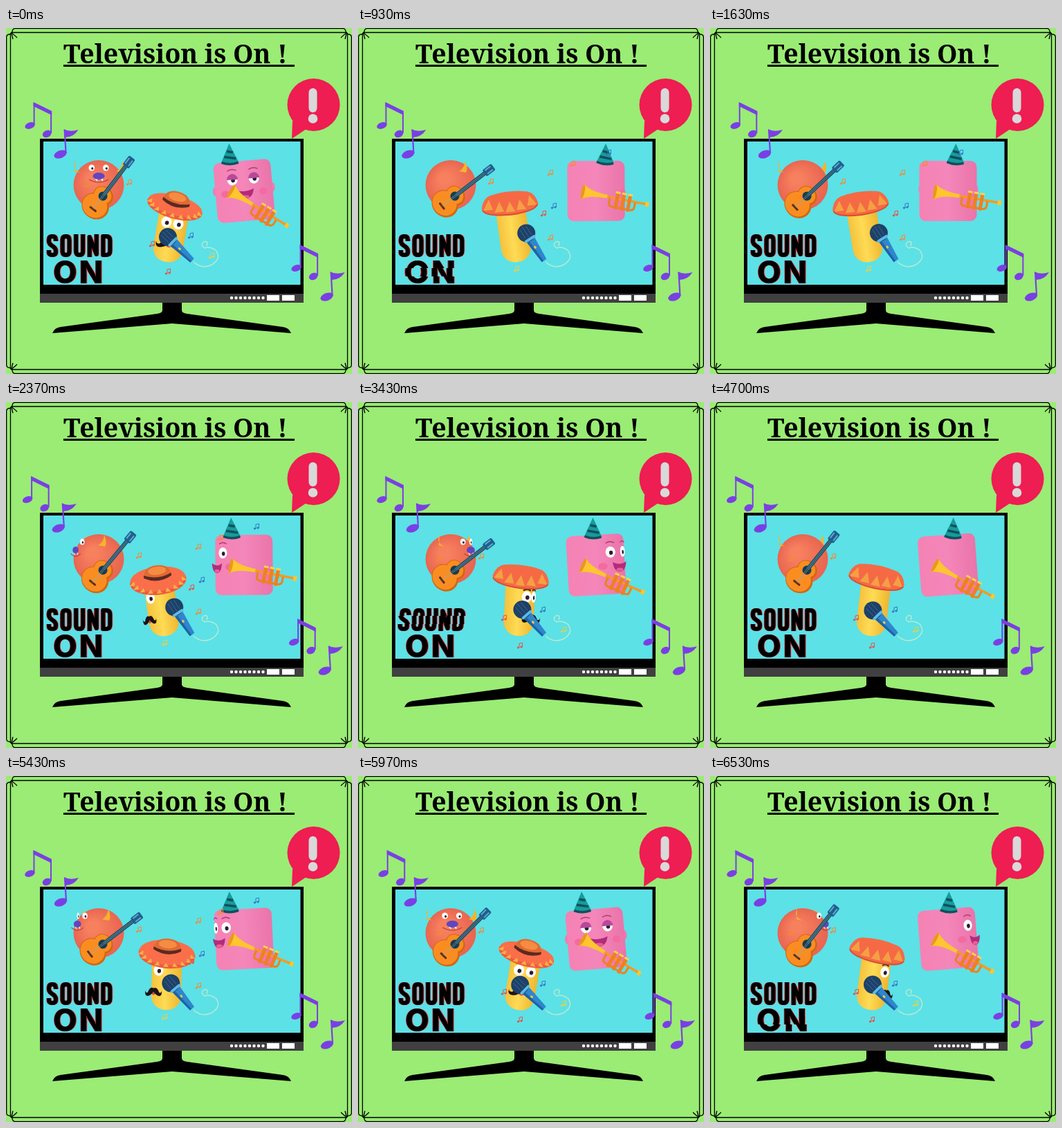
Write an HTML page with a canvas that moves like this. It is 500 by 500 pixels and loops after 6.56 s.

```html
<!DOCTYPE html>
<html lang="en">
<head>
<meta charset="utf-8">
<title>Television is On</title>
<style>
  html, body { margin: 0; width: 100%; height: 100%; overflow: hidden; background: #9aec74; }
  svg, canvas { position: absolute; left: 0; top: 0; width: 500px; height: 500px; }
  .title { font: bold 37.4px "Noto Serif", serif; white-space: pre; }
</style>
</head>
<body>
<svg viewBox="0 0 500 500">
  <defs>
    <g id="corner" fill="none" stroke="#000" stroke-width="1.3">
      <path d="M250 6.500H7M6.500 250V7M250 .7H13Q9 1 9 6M.7 250V13Q1 9 6 9M7 7Q10 8 16 14M8 8Q9 12 10 16"/>
    </g>
  </defs>
  <use href="#corner"/>
  <use href="#corner" transform="matrix(-1 0 0 1 500 0)"/>
  <use href="#corner" transform="matrix(1 0 0 -1 0 500)"/>
  <use href="#corner" transform="matrix(-1 0 0 -1 500 500)"/>

  <text class="title" x="83" y="51">Television is On !</text>
  <path d="M83 54.500H417" stroke="#000" stroke-width="3"/>

  <path fill="#ee1d52" d="M414 134L413 160L434 146Z"/>
  <circle cx="444.500" cy="111" r="38" fill="#ee1d52"/>
  <path d="M443.500 93V116" stroke="#d9d9d9" stroke-width="12" stroke-linecap="round"/>
  <circle cx="443.500" cy="131" r="6.800" fill="#d9d9d9"/>

  <path d="M49 160H430V397H49Z"/>
  <path fill="#5ce1e6" d="M54 164H425.500V371H54Z"/>
  <path fill="#404040" d="M49 384H430V397H49Z"/>
  <path d="M326 390H373" stroke="#fff" stroke-width="4.400" stroke-linecap="round" stroke-dasharray="0 6.500"/>
  <path fill="#fff" d="M377 386h18v8h-18zM399 386h18v8h-18z"/>
  <path d="M226 397H254V408Q254 412 262 413L400 432Q409 433 412 441L240 427L67 441Q70 433 79 432L218 413Q226 412 226 408Z"/>
</svg>
<canvas id="stage" width="500" height="500" role="img" aria-label="Sound on: three characters play music"></canvas>
<script>
const ctx = document.getElementById('stage').getContext('2d');
const TAU = Math.PI * 2, DEG = Math.PI / 180;

// Periods in ms.
const LOOP = 6560, TURN = 2970, SWAY = 660, STRUM = 1000 / 6, SHAKE = 200;

const wave = (t, period, shift = 0) => Math.cos(TAU * (t / period - shift));

function at(x, y, angle, draw) {
  ctx.save();
  ctx.translate(x, y);
  ctx.rotate(angle * DEG);
  draw();
  ctx.restore();
}

function fill(color, d) {
  ctx.fillStyle = color;
  ctx.fill(new Path2D(d));
}

function line(color, width, d) {
  ctx.strokeStyle = color;
  ctx.lineWidth = width;
  ctx.stroke(new Path2D(d));
}

function oval(color, x, y, rx, ry = rx, angle = 0) {
  ctx.fillStyle = color;
  ctx.beginPath();
  ctx.ellipse(x, y, rx, ry, angle * DEG, 0, TAU);
  ctx.fill();
}

function box(color, x, y, w, h, r = 0) {
  ctx.fillStyle = color;
  ctx.beginPath();
  ctx.roundRect(x, y, w, h, r);
  ctx.fill();
}

function glow(x, y, r, inner, outer) {
  const g = ctx.createRadialGradient(x - r / 4, y - r / 4, r / 5, x, y, r);
  g.addColorStop(0, inner);
  g.addColorStop(1, outer);
  return g;
}

// A feature on the surface of a body that turns about its upright axis.
function onFace(x, y, r, angle, draw) {
  const depth = Math.cos(angle * DEG);
  if (depth < 0.08) return;
  ctx.save();
  ctx.translate(x + r * Math.sin(angle * DEG), y);
  ctx.scale(0.3 + 0.7 * depth, 1);
  draw();
  ctx.restore();
}

function eye(r, lid) {
  oval('#fff', 0, 0, r);
  oval('#2b1c30', 1, 1, r * 0.38);
  if (lid) {
    ctx.fillStyle = lid;
    ctx.beginPath();
    ctx.arc(0, 0, r + 0.5, Math.PI, TAU);
    ctx.fill();
  }
}

function monster(yaw, strum) {
  const horn = a => {
    const x = 134 + 31 * Math.sin((yaw + a) * DEG);
    const lean = x < 134 ? -1 : 1;
    fill('#f5b32c', `M${x - 5} 207Q${x + 3 * lean} 203 ${x + 4 * lean} 192Q${x + 9 * lean} 204 ${x + 5} 209Z`);
  };
  const front = a => Math.cos((yaw + a) * DEG) > 0;
  [-80, 80].filter(a => !front(a)).forEach(horn);
  oval(glow(134, 227, 37, '#f7805f', '#e8644f'), 134, 227, 36.5, 36);
  [-80, 80].filter(front).forEach(horn);
  for (const a of [-20, 20]) onFace(134, 202, 30, yaw + a, () => eye(4.5));
  onFace(134, 214, 35, yaw, () => {
    fill('#fff', 'M-6 3H-2V8ZM2 3H6V8Z');
    oval('#6046c0', 0, 0, 8.5, 5);
    line('#a83c44', 1.2, 'M-14 5Q0 13 14 5');
  });

  at(140, 243, -45.5 - 8 * strum, () => {
    oval('#d2680f', -18, 0, 18.5, 20.5);
    oval('#d2680f', 1, 0, 13, 15);
    oval('#fa8d22', -18, -1, 17, 18.5);
    oval('#fa8d22', 1, -1, 11.5, 13);
    oval('#173c50', 0, 0, 6.5);
    box('#5a3018', -25, -6, 3, 12, 1);
    box('#1d4f68', 2, -3, 54, 6);
    line('#8fb0b4', 0.6, 'M-23 -1H56M-23 1H56');
    box('#1f5f8c', 54, -5.5, 16, 11, 2);
    for (const y of [-4, 2]) box('#5fa8d0', 57, y, 10, 2);
  });
}

function sombrero(yaw) {
  const pitch = Math.cos((yaw + 60) * DEG);
  const open = Math.max(pitch, 0);
  const ry = 13 + 7 * open;
  if (pitch > 0.05) {
    oval('#ee5a3c', 0, 4, 41, ry);
    oval('#fb6e4a', 0, 1, 40, ry - 2);
    for (let k = 0; k < 9; k++) {
      const a = (12 + k * 19.5) * DEG, x = 39 * Math.cos(a), y = 3 + (ry - 1) * Math.sin(a);
      fill('#f5b04a', `M${x - 4} ${y}H${x + 4}L${x * 0.9} ${y - 6}Z`);
    }
    fill('#e06a32', 'M-20 -3Q-19 -19 0 -19Q19 -19 20 -3Q0 8 -20 -3Z');
    fill('#5a2a22', 'M-20 -6Q0 3 20 -6V-2Q0 9 -20 -2Z');
    oval('#f58c42', 0, -11, 13, 6);
  } else {
    fill('#f56a45', 'M-41 2Q-37 -14 -25 -16Q0 -21 25 -16Q37 -14 41 2Q38 14 0 15Q-38 14 -41 2Z');
    for (let x = -32; x <= 32; x += 16) {
      const y = 11 - x * x / 170;
      fill('#f59f45', `M${x - 7} ${y}H${x + 7}L${x * 0.92} ${y - 15}Z`);
    }
    line('#d94c34', 2, 'M-40 4Q-36 14 0 15Q36 14 40 4');
  }
}

function singer(yaw, sway) {
  at(231, 338, 9.5 * sway, () => {
    const skin = ctx.createLinearGradient(-22, 0, 22, 0);
    skin.addColorStop(0, '#f4c13c');
    skin.addColorStop(0.45, '#ffdb55');
    skin.addColorStop(1, '#eeb52f');
    box(skin, -21.5, -90, 43, 90, 20);
    for (const a of [-26, 26]) onFace(0, -57, 20, yaw + a, () => {
      eye(8);
      line('#33211a', 2, 'M-6 -9Q0 -13 6 -9');
    });
    onFace(0, -27, 21, yaw, () => {
      fill('#d94a4a', 'M-6 1Q0 11 6 1Z');
      fill('#1c1412', 'M0 -4Q8 -7 13 2Q18 4 19 -1Q20 9 11 7Q5 6 0 1Q-5 6 -11 7Q-20 9 -19 -1Q-18 4 -13 2Q-8 -7 0 -4Z');
    });
    at(0, -84, 3.5 + 2.5 * sway, () => sombrero(yaw));
  });

  line('#b5ead2', 1.5, 'M271 338Q284 350 299 341Q312 332 303 321Q294 315 287 318Q280 313 286 309Q293 307 290 315');
  const x = 239 - 5 * sway, y = 299 + 3 * sway;
  at(x, y, Math.atan2(336 - y, 269 - x) / DEG, () => {
    const end = Math.hypot(336 - y, 269 - x);
    fill('#2f86cc', `M8 -7L${end} -4V4L8 7Z`);
    fill('#1d64a4', `M8 3L${end} 1V4L8 7Z`);
    oval('#1d4168', 0, 0, 13);
    box('#5cb9e8', 8, -9, 4, 18, 2);
    line('#39628c', 1, 'M-9 -5L6 -5M-11 0H7M-9 5L6 5');
    box('#f3c64a', 22, -1, 4, 3, 1);
  });
}

function trumpeter(yaw, sway) {
  const hatX = 341 + 20 * Math.sin((yaw - 60) * DEG);
  at(344, 235, -2.5 - 2.5 * sway, () => {
    const skin = ctx.createLinearGradient(-42, 0, 42, 0);
    skin.addColorStop(0, '#f582b4');
    skin.addColorStop(0.5, '#f486ba');
    skin.addColorStop(1, '#e974aa');
    for (const a of [-92, 92]) oval('#ee7cb0', 41 * Math.sin((yaw + a) * DEG), -2, 4, 7);
    box(skin, -41.5, -43, 83, 87, 9);
    for (const a of [-23, 23]) onFace(0, -17, 40, yaw + a, () => {
      eye(8, sway > 0.85 ? '#b8489a' : '');
      line('#a93b70', 1.5, 'M-7 -13Q0 -17 7 -13');
    });
    for (const a of [-42, 42]) onFace(0, 3, 41, yaw + a, () => oval('#f56a9f', 0, 0, 7, 5));
    onFace(0, 3, 41, yaw, () => {
      fill('#b02c7c', 'M-14 -5Q0 1 14 -5Q12 9 0 9Q-12 9 -14 -5Z');
      oval('#ee5b94', 0, 6, 7, 2.5);
    });
  });

  at(hatX, 196, (hatX - 341) * 0.15, () => {
    fill('#159c9c', 'M0 -29L13 -1Q0 4 -13 -1Z');
    line('#124f5c', 3.5, 'M-4 -18L5 -16M-8 -10L9 -7M-12 -2Q0 3 12 -1');
  });

  at(327, 237, 20.5 + 11 * sway, () => {
    line('#f59a23', 3.5, 'M20 0H92');
    line('#e98420', 3, 'M38 1V9Q38 13 43 13H69Q75 13 75 8V1');
    for (const x of [46, 55, 64]) {
      box('#f07f22', x, -8, 5, 24, 2);
      box('#ffd34d', x - 1, -10, 7, 3, 1);
    }
    fill('#ffc62e', 'M-3 -12Q6 -3 34 -2.5V2.5Q6 3 -3 12Q1 0 -3 -12Z');
    oval('#e9981e', -2, 0, 2.5, 11);
    box('#ffc62e', 90, -3.5, 5, 7, 1);
  });
}

function tinyNote(x, y, color) {
  oval(color, x - 2.5, y + 3, 1.7, 1.4);
  oval(color, x + 2, y + 2, 1.7, 1.4);
  line(color, 1, `M${x - 1} ${y + 3}V${y - 3}L${x + 3.5} ${y - 4}V${y + 2}`);
}

const O = '#f48a35', R = '#e5534b', B = '#3478c6', Y = '#e9cf4a';
const NOTES_OUT = [[117, 226, O], [178, 223, O], [211, 312, R], [234, 352, R], [267, 300, B], [297, 329, Y]];
const NOTES_IN = [[192, 222, O], [268, 268, R], [283, 257, B], [278, 303, O], [278, 209, O], [229, 348, Y], [362, 180, B], [310, 196, O]];

function bigNotes(t) {
  const purple = '#7a3fe4';
  const pairX = 3 * wave(t, STRUM, 0.8) - 1.2;
  const singleX = 3.5 * wave(t, SHAKE, 0.1) - 3.3;
  for (const [dx, dy] of [[0, 0], [385, 206]]) {
    at(dx + pairX, dy, 0, () => {
      oval(purple, 35, 141, 7.5, 4.5, -20);
      oval(purple, 59.5, 153, 6.5, 5, -25);
      line(purple, 2, 'M41 140V108M65.5 152V121');
      fill(purple, 'M40 107L66.5 120V126L40 113Z');
    });
    at(dx + singleX, dy, 0, () => {
      oval(purple, 79, 182.5, 9.5, 5.5, -20);
      line(purple, 2.2, 'M87 181L85 147');
      fill(purple, 'M84 146Q92 151 105 147Q98 158 86 158Z');
    });
  }
}

// Tall narrow lettering, one stroke shape per letter.
const LETTERS = [
  'M13 10V8Q13 3 8 3T3 8V10Q3 14 8 17T13 24V26Q13 30 8 30T3 26V23',
  'M3 8Q3 3 8 3T13 8V25Q13 30 8 30T3 25Z',
  'M3 0V25Q3 30 8 30T13 25V0',
  'M3 33V4L13 29V0',
  'M3 3H7Q13 3 13 9V24Q13 30 7 30H3Z'
];

function sound(color) {
  LETTERS.forEach((d, i) => at(59 + i * 19.6, 298, 0, () => line(color, 5.8, d)));
}

function on(color) {
  ctx.font = '800 45px Inter, sans-serif';
  ctx.letterSpacing = '3px';
  ctx.fillStyle = color;
  ctx.fillText('ON', 68, 369);
}

// Red fringe all the time, shifted slices while a burst lasts.
function glitch(word, top, t, peak) {
  const away = Math.abs((t - peak + 4200) % 2800 - 1400);
  const force = away < 200 ? 1.6 : 0;
  const beat = Math.floor(t / 100);
  for (let k = 0; k < 3; k++) {
    const shift = force * Math.sin(k * 2.1 + beat * 1.7);
    ctx.save();
    ctx.beginPath();
    ctx.rect(50, top + k * 12, 115, 12);
    ctx.clip();
    for (const [color, dx] of [['#e0323c', 0.9], ['#c8323c', -0.8], ['#000', 0]]) {
      at(shift + dx, 0, 0, () => word(color));
    }
    ctx.restore();
  }
}

function frame(now) {
  const t = now % LOOP;
  const yaw = t / TURN * 360, sway = wave(t, SWAY);
  ctx.clearRect(0, 0, 500, 500);
  ctx.lineJoin = 'round';
  monster(yaw, wave(t, STRUM, 0.08));
  singer(yaw, sway);
  trumpeter(yaw, sway);
  for (const note of sway > 0.2 ? NOTES_OUT : NOTES_IN) tinyNote(...note);
  glitch(sound, 297, t, 3430);
  glitch(on, 335, t, 930);
  bigNotes(t);
  requestAnimationFrame(() => frame(performance.now() - start));
}

const start = performance.now();
frame(0);
</script>
</body>
</html>
```
